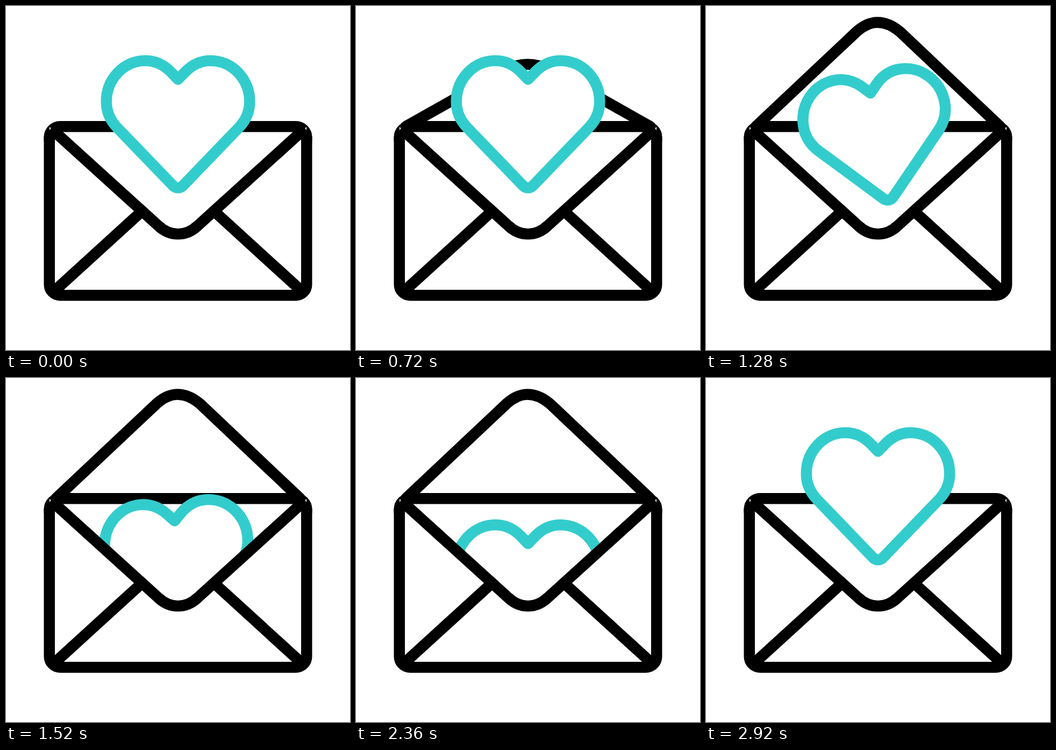
Write an HTML page that moves like this. It is 640 px wide and 640 px high and loops after 3000 ms.

```html
<!DOCTYPE html>
<html lang="en">
<head>
<meta charset="utf-8">
<title>Love letter</title>
<style>
  html, body { margin: 0; height: 100%; overflow: hidden; background: #fff; }
  svg { display: block; width: 100%; height: 100%; }
  path { fill: none; stroke: #000; stroke-width: 20.5; stroke-linecap: round; stroke-linejoin: round; }
  #flap { vector-effect: non-scaling-stroke; }
  #heart { fill: #fff; stroke: #3cc; }
  #pocket { fill: #fff; stroke: none; }
</style>
</head>
<body>
<svg viewBox="0 0 640 640">
  <!-- The flap hinges on y = 0 and is scaled vertically. -->
  <path id="flap" d="M93 0L281 -177Q300 -193.5 319 -193.5Q340 -193.5 361 -176L547 0"/>
  <path d="M80.7 250V244.2a20 20 0 0 1 20 -20H539.3a20 20 0 0 1 20 20V250"/>
  <!-- The heart is centred on the origin. -->
  <path id="heart" d="M0 -83.5L-14 -98C-27 -111 -43 -118.3 -60.5 -118.3C-101 -118.3 -133.3 -84 -133.3 -42
    C-133.3 -24 -126 -7 -113 6.5L-9.5 114Q0 122.5 9.5 114L113 6.5
    C126 -7 133.3 -24 133.3 -42C133.3 -84 101 -118.3 60.5 -118.3C43 -118.3 27 -111 14 -98Z"/>
  <path id="pocket" d="M81 225L283 408.5C305 429.5 335 429.5 357 408.5L559 225V538H81Z"/>
  <path d="M91 234.4L283 408.5C305 429.5 335 429.5 357 408.5L549 234.4M93 527.5L252 382.5M547 527.5L388 382.5"/>
  <path d="M80.7 244V518.2a20 20 0 0 0 20 20H539.3a20 20 0 0 0 20 -20V244"/>
</svg>
<script>
  const LOOP = 3000, STEP = 40;
  const flap = document.getElementById('flap');
  const heart = document.getElementById('heart');

  const progress = (t, start, length) => Math.min(1, Math.max(0, (t - start) / length));

  function ease(t, start, length) {
    const u = progress(t, start, length);
    return u * u * (3 - 2 * u);
  }

  const pulse = (t, start, length) => Math.sin(Math.PI * progress(t, start, length)) ** 2;

  function draw(t) {
    const open = ease(t, 560, 283) - ease(t, 2640, 280);
    flap.style.visibility = open > 0.01 ? 'visible' : 'hidden';
    flap.setAttribute('transform', `translate(0 224) scale(1 ${Math.max(open, 0.01)})`);

    const hop = -34 * ease(t, 840, 200);
    const drop = 210 * ease(t, 1040, 692);
    const rise = -176 * ease(t, 2330, 316);
    const tilt = 9.7 * (ease(t, 1280, 452) - ease(t, 840, 240));
    const beat = 1 + 0.047 * pulse(t, 180, 380) + 0.036 * pulse(t, 1700, 350);
    heart.setAttribute('transform', `translate(320 ${220 + hop + drop + rise}) rotate(${tilt}) scale(${beat})`);
  }

  const start = performance.now();
  function frame() {
    const t = (performance.now() - start) % LOOP;
    draw(Math.floor(t / STEP) * STEP);
    requestAnimationFrame(frame);
  }
  frame();
</script>
</body>
</html>
```
